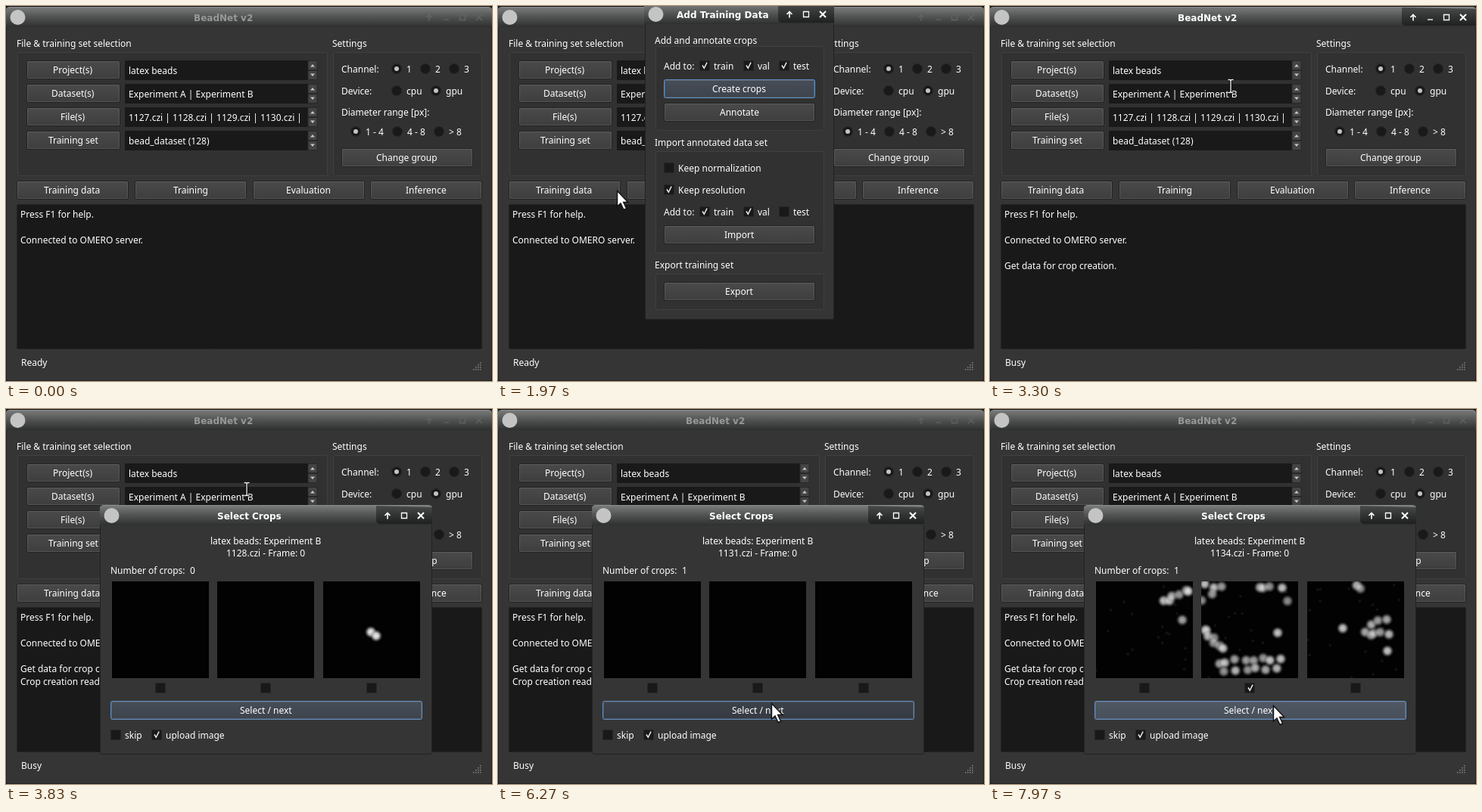
These frames come from a looping animation (642x496 px, 8000 ms). An HTML page:

```html
<!DOCTYPE html>
<html lang="en">
<head>
<meta charset="utf-8">
<title>BeadNet v2</title>
<style>
  html, body { margin: 0; width: 100%; height: 100%; overflow: hidden; background: #111; }
  svg { display: block; font: 12px "Noto Sans", sans-serif; fill: #fff; }
  .title { font: bold 12px "DejaVu Sans", sans-serif; }
</style>
</head>
<body>
<script>
const LOOP = 8000;
// Story beats in ms
const OPEN = 1500, CREATE = 3070, CLOSE = 3170, BUSY = 3270, READY = 3530, CROPS = 3670,
  PICK = 4880, NEXT = 5330, SECOND = 5830, SKIP = 6270, THIRD = 6640, PICK2 = 7800;

let rules = '', count = 0;
const pct = t => t / LOOP * 100 + '%';
function animate(frames, timing, body) {
  const name = 'k' + count++;
  rules += `@keyframes ${name}{${frames}}`;
  return `<g style="animation:${name} ${LOOP}ms ${timing} infinite">${body}</g>`;
}
const during = (from, to, body) => animate(
  `0%{opacity:0}${pct(from)}{opacity:1}${pct(to)}{opacity:0}`, 'step-end', body);
const since = (from, body) => during(from, LOOP, body);

let seed = 7;
const random = () => (seed = seed * 16807 % 2147483647) / 2147483647;
const times = (n, make) => Array.from({ length: n }, (_, i) => make(i)).join('');

// Widgets
const rect = (x, y, w, h, fill, more = '') =>
  `<rect x="${x}" y="${y}" width="${w}" height="${h}" fill="${fill}" ${more}/>`;
const text = (x, y, s, cls = '', fill = '#fff') =>
  `<text x="${x}" y="${y}" class="${cls}" fill="${fill}">${s}</text>`;
const line = (d, color, width = 1) =>
  `<path d="${d}" fill="none" stroke="${color}" stroke-width="${width}"/>`;
const dot = (x, y, r, fill, more = '') => `<circle cx="${x}" cy="${y}" r="${r}" fill="${fill}" ${more}/>`;
const frame = (x, y, w, h) =>
  rect(x + .5, y + .5, w - 1, h - 1, '#313131', 'rx="2" stroke="#404040"');

// states: list of [from, to, overlay colour], painted below the label
function button(x, y, w, label, focus, states = []) {
  return rect(x + .5, y + .5, w - 1, 24, focus ? 'url(#focus)' : 'url(#btn)',
      `rx="2" stroke="${focus ? '#5f8fc7' : '#222'}"`) +
    states.map(([a, b, c]) => during(a, b, rect(x + 1, y + 1, w - 2, 23, c))).join('') +
    rect(x + 1.5, y + 1.5, w - 3, 22, 'none', 'rx="1" stroke="#fff" stroke-opacity=".11"') +
    text(x + w / 2, y + 17, label, 'mid');
}
const HOVER = 'rgba(140,160,190,.12)', PRESS = 'rgba(0,0,0,.14)';

const tick = (x, y) => line(`M${x + 4} ${y + 6.5}l2.3 3.8 3.8-7.6`, '#eee', 1.5);
const check = (x, y, label, on) =>
  rect(x + .5, y + .5, 13, 13, '#191919', 'rx="1" stroke="#272727"') +
  (on ? tick(x, y) : '') + text(x + 19, y + 11.5, label);
const radios = (x, y, step, labels, chosen) => labels.map((s, i) =>
  dot(x + i * step, y, 6.5, '#191919', 'stroke="#252525"') +
  (i === chosen ? dot(x + i * step, y, 3, '#c4c4c4') : '') +
  text(x + i * step + 13, y + 5, s)).join('');

function field(y, value) {
  const spin = (top, d) => rect(399, top, 12, 12, '#444', 'stroke="#282828"') +
    `<path d="M402 ${top + 6 - d * 2}h6l-3 ${d * 3.5}z" fill="#c8c8c8"/>`;
  return rect(157, y, 254, 26, '#191919', 'rx="1"') + spin(y + .5, -1) + spin(y + 13.5, 1) +
    text(162, y + 18, value);
}

function titlebar(x, y, w, title, cx, active, right, minimise) {
  const ink = active ? '#fff' : '#626262', cy = y + 15;
  const [close, max, min, last] = [0, 22, 44, 66].map(d => right - d);
  const pin = minimise ? last : min;
  return `<path d="M${x} ${y + 28}v-23q0-4 5-4h${w - 10}q5 0 5 4v23z" fill="url(#bar)"/>` +
    line(`M${x + 4} ${y + 1.5}h${w - 8}`, '#8c8c8c') +
    (active ? `<path d="M${pin - 15} ${y + 2}v19q0 5 6 5H${x + w}V${y + 4}z" fill="#000" fill-opacity=".4"/>` : '') +
    dot(x + 15.5, cy, 10, '#c4c4c4') +
    text(cx, y + 20, title, 'title mid', active ? '#fff' : '#989898') +
    line(`M${close - 4} ${cy - 4}l8 8m0-8l-8 8`, ink, active ? 2 : 1.3) +
    line(`M${max - 3.5} ${cy - 3.5}h7v7h-7z`, ink, 1.3) +
    (minimise ? line(`M${min - 3} ${cy + 3}h7`, ink, 1.3) : '') +
    line(`M${pin} ${cy + 4.5}v-8m-3.5 3.5l3.5-3.5 3.5 3.5`, ink, 1.6);
}
const panel = (x, y, w, h) =>
  rect(x + .5, y + 8, w - 1, h - 8.5, '#353535', 'rx="2" stroke="#222"');

// Main window
const mainBar = active => titlebar(0, 0, 642, 'BeadNet v2', 288, active, 625, true);
function mainWindow() {
  const rows = [['Project(s)', 'latex beads'], ['Dataset(s)', 'Experiment A | Experiment B'],
    ['File(s)', '1127.czi | 1128.czi | 1129.czi | 1130.czi |'], ['Training set', 'bead_dataset (128)']];
  const tabs = ['Training data', 'Training', 'Evaluation', 'Inference'];
  const log = ['Press F1 for help.', '', 'Connected to OMERO server.', '',
    'Get data for crop creation.', 'Crop creation ready.'];
  const logTimes = [0, 0, 0, 0, BUSY, READY];
  return panel(0, 0, 642, 496) + mainBar(false) +
    during(1270, OPEN, mainBar(true)) + during(CLOSE, CROPS, mainBar(true)) +
    text(14, 54, 'File &amp; training set selection') + frame(15, 61, 410, 164) +
    rows.map(([a, b], i) => button(27, 72 + 31 * i, 124, a) + field(72 + 31 * i, b)).join('') +
    text(431, 54, 'Settings') + frame(432, 61, 197, 164) +
    text(443, 88, 'Channel:') + radios(516, 83, 38, ['1', '2', '3'], 0) +
    text(443, 117, 'Device:') + radios(516, 112, 52, ['cpu', 'gpu'], 1) +
    text(443, 145, 'Diameter range [px]:') + radios(462, 166, 55, ['1 - 4', '4 - 8', '&gt; 8'], 0) +
    button(443, 188, 174, 'Change group') +
    tabs.map((s, i) => button(Math.round(14 + 155.8 * i), 231, 148, s, false,
      i ? [] : [[1270, 1400, PRESS]])).join('') +
    rect(14.5, 262.5, 614, 191, '#191919', 'rx="1" stroke="#242424"') +
    log.map((s, i) => since(logTimes[i], text(19, 280 + 17 * i, s))).join('') +
    during(0, BUSY, text(20, 476, 'Ready')) + since(BUSY, text(20, 476, 'Busy')) +
    times(4, i => times(i + 1, j => rect(626 - j * 3, 471 + i * 3, 1.5, 1.5, '#858585')));
}

// Dialogs
function trainingDialog() {
  const targets = (y, test) => text(219, y + 11.5, 'Add to:') +
    check(266, y, 'train', 1) + check(324, y, 'val', 1) + check(371, y, 'test', test);
  return panel(194, -4, 250, 419) +
    titlebar(193, -4, 251, 'Add Training Data', 297, true, 429) +
    text(207, 50, 'Add and annotate crops') + frame(208, 53, 223, 112) + targets(72, 1) +
    button(219, 97, 200, 'Create crops', true, [[2800, CREATE, HOVER], [CREATE, CLOSE, PRESS]]) +
    button(219, 128, 200, 'Annotate') +
    text(207, 185, 'Import annotated data set') + frame(208, 192, 223, 135) +
    check(219, 207, 'Keep normalization') + check(219, 236, 'Keep resolution', 1) + targets(265, 0) +
    button(219, 290, 200, 'Import') +
    text(207, 347, 'Export training set') + frame(208, 354, 223, 48) + button(219, 365, 200, 'Export');
}

const bead = (x, y, light) => dot(x, y, 8.5, 'url(#bead)', `opacity="${light}"`);
// n beads strung loosely between two points
const chain = (x0, y0, x1, y1, n) => times(n, i => {
  const k = n > 1 ? i / (n - 1) : 0, jitter = n > 1 ? 7 : 0;
  return bead(x0 + (x1 - x0) * k + (random() - .5) * jitter,
    y0 + (y1 - y0) * k + (random() - .5) * jitter, .6 + random() * .25);
});
const specks = () => times(18, () => dot(random() * 128, random() * 128, 2, '#111'));
const clusters = [
  () => chain(90, 27, 123, 12, 6) + chain(114, 51, 114, 51, 1),
  () => chain(4, 6, 24, 5, 3) + chain(4, 27, 18, 16, 2) + chain(76, 8, 91, 4, 3) + chain(107, 12, 113, 23, 2) +
    chain(101, 68, 101, 68, 1) + chain(5, 63, 26, 86, 7) + chain(21, 107, 104, 100, 8) + chain(32, 118, 98, 116, 6),
  () => chain(66, 4, 71, 10, 2) + chain(47, 62, 47, 62, 1) + chain(79, 64, 104, 50, 4) +
    chain(81, 74, 105, 68, 4) + chain(106, 92, 106, 92, 1)
];

function cropDialog() {
  const file = n => text(344, 195, n + '.czi - Frame: 0', 'mid');
  const crop = i => {
    const x = Math.round(139.8 + 139.5 * i);
    return `<svg x="${x}" y="228" width="128" height="128">` + rect(0, 0, 128, 128, '#020202') +
      (i === 2 ? during(CROPS, SECOND, bead(63, 67, 1) + bead(70, 72, 1)) : '') +
      since(THIRD, specks() + clusters[i]()) + '</svg>' + check(x + 57, 362, '');
  };
  return panel(124, 126, 439, 331) +
    titlebar(124, 126, 439, 'Select Crops', 322, true, 548) +
    text(344, 179, 'latex beads: Experiment B', 'mid') +
    during(CROPS, SECOND, file(1128)) + during(SECOND, THIRD, file(1131)) + since(THIRD, file(1134)) +
    text(138, 218, 'Number of crops:') +
    during(CROPS, SECOND, text(243, 218, '0')) + since(SECOND, text(243, 218, '1')) +
    times(3, crop) + during(PICK, SECOND, tick(476, 362)) + since(PICK2, tick(337, 362)) +
    button(138, 386, 412, 'Select / next', true,
      [[NEXT, 5630, PRESS], [SKIP, 6500, PRESS], [7900, LOOP, HOVER]]) +
    check(138, 424, 'skip') + check(192, 424, 'upload image', 1);
}

// Pointer: a sweep around the window, then eased moves [start, end, x, y]
const moves = [[830, 1100, 90, 242], [1270, 1970, 157, 244], [1970, 2100, 222, 202], [2100, 2450, 390, 18],
  [2450, 2870, 314, 103], [CREATE, CLOSE, 318, 106], [3830, 4150, 550, 190], [4150, 4540, 518, 84],
  [4540, 4830, 480, 367], [4960, 5260, 361, 389], [7100, 7400, 330, 309], [7630, 7780, 342, 367],
  [7830, 7950, 374, 392]];
function pointer(shape) {
  let frames = '', x, y;
  const key = (t, ease) =>
    frames += `${pct(t)}{transform:translate(${x}px,${y}px);animation-timing-function:${ease}}`;
  for (let i = 0; i <= 18; i++) {
    const a = Math.PI * (.5 + i / 12);
    x = 283 + 268 * Math.cos(a);
    y = 262 + 178 * Math.sin(a);
    key(30 + i * 800 / 18, 'linear');
  }
  for (const [from, to, nx, ny] of moves) {
    key(from, 'ease-in-out');
    x = nx; y = ny;
    key(to, 'linear');
  }
  key(LOOP, 'linear');
  return animate(frames, 'linear', shape);
}
const arrow = '<path d="M.5 .5V21L5 17l4 8.5 3.6-1.6-4-8.4h6z" fill="#fff" stroke="#111" stroke-width="1.4"/>';
const beamPath = 'M-3.5-8.5h2.5l1 1 1-1h2.5M0-7.5v15M-3.5 8.5h2.5l1-1 1 1h2.5';
const beam = line(beamPath, '#000', 3) + line(beamPath, '#fff', 1.3);
const cursor = during(30, 297, beam) + during(297, 480, arrow) + during(480, 640, beam) +
  during(640, CLOSE, arrow) + during(CLOSE, 3880, beam) + since(3880, arrow);

const gradient = (id, ...stops) => `<linearGradient id="${id}" x2="0" y2="1">` +
  stops.map((c, i) => `<stop offset="${i / (stops.length - 1)}" stop-color="${c}"/>`).join('') + '</linearGradient>';
const glow = `<radialGradient id="bead"><stop offset="0" stop-color="#f4f4f4"/>
  <stop offset=".45" stop-color="#d0d0d0" stop-opacity=".9"/>
  <stop offset="1" stop-color="#666" stop-opacity="0"/></radialGradient>`;

const scene = `<svg width="642" height="496"><defs>` +
  gradient('bar', '#7c7e7e', '#515353', '#2e3030') + gradient('btn', '#4a4a4a', '#3e3e3e') +
  gradient('focus', '#474d56', '#3e444d') + glow + '</defs>' +
  mainWindow() + during(OPEN, CLOSE, trainingDialog()) + since(CROPS, cropDialog()) +
  pointer(cursor) + '</svg>';

const style = document.createElement('style');
style.textContent = rules;
document.head.append(style);
document.body.innerHTML = scene;

// Centred labels start on whole pixels
for (const label of document.querySelectorAll('.mid'))
  label.setAttribute('x', Math.floor(label.getAttribute('x') - label.getComputedTextLength() / 2));
</script>
</body>
</html>
```
